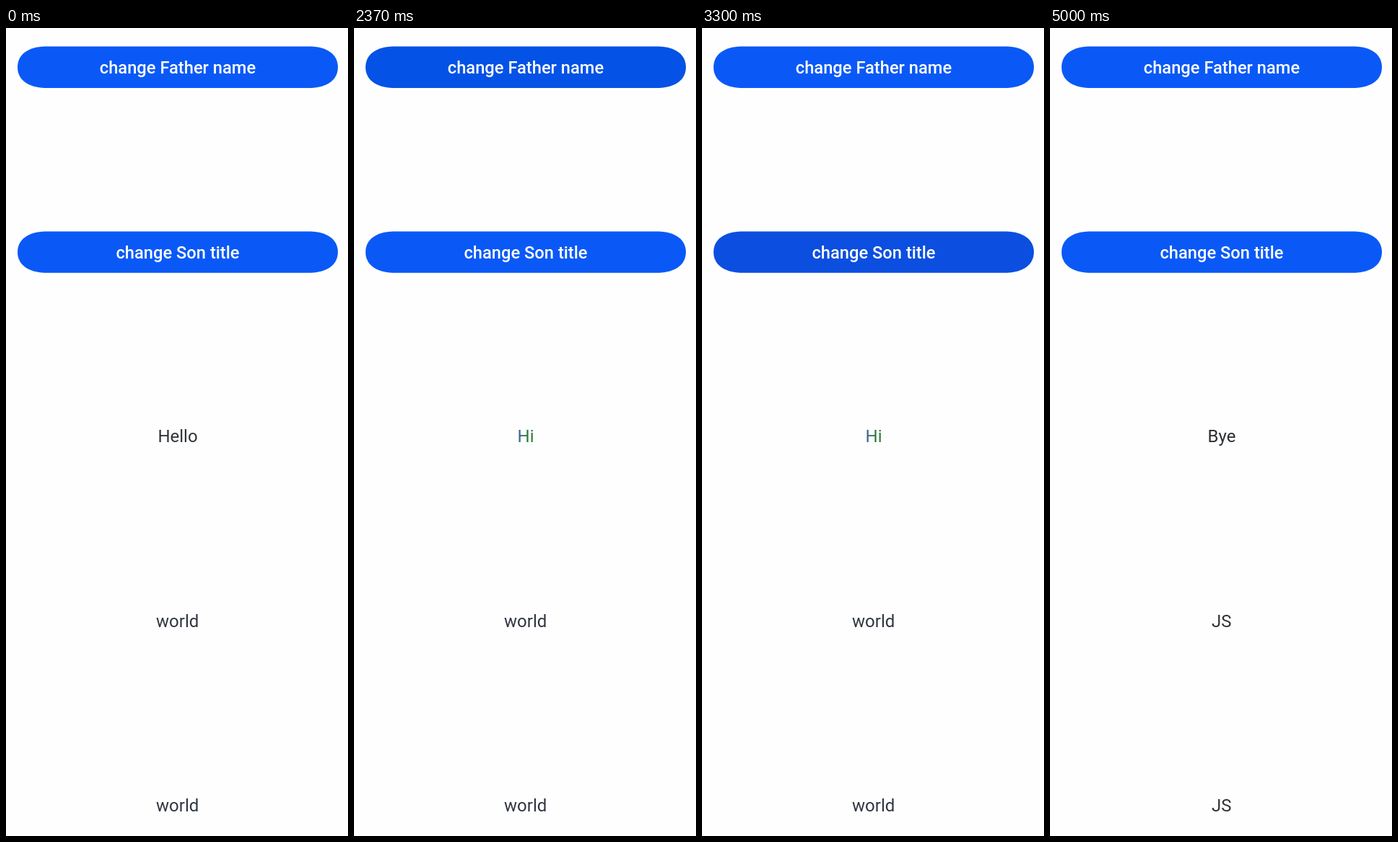
These frames come from a looping animation (474 px wide and 1118 px high, 7.33 s). An HTML page:

```html
<!DOCTYPE html>
<html lang="en">
<head>
<meta charset="utf-8">
<title>Father and Son state</title>
<style>
  html, body { margin: 0; width: 100%; height: 100%; overflow: hidden; background: #fefefe; }
  svg { display: block; width: 100%; height: 100%; }
  text { font: 400 24px Roboto, "Noto Sans", sans-serif; text-anchor: middle; }
  .label { font-weight: 500; font-size: 23.7px; fill: #fff; }
</style>
</head>
<body>
<svg viewBox="0 0 474 1118">
  <defs>
    <linearGradient id="tint" gradientUnits="userSpaceOnUse" x1="228" x2="248" y1="0" y2="0">
      <stop offset="0" stop-color="#3f6688"/>
      <stop offset=".4" stop-color="#3a6c70"/>
      <stop offset=".62" stop-color="#2b7a35"/>
      <stop offset="1" stop-color="#2f7d31"/>
    </linearGradient>
    <path id="pill" d="M54 0H422C445 .6 460 11 460 28.7S445 56.8 422 57.4H54C31 56.8 16 46.4 16 28.7S31 .6 54 0Z"/>
  </defs>
  <use id="father" href="#pill" y="25.6"/>
  <text class="label" x="238" y="63">change Father name</text>
  <use id="son" href="#pill" y="281.4"/>
  <text class="label" x="238" y="318.5">change Son title</text>
  <text id="name" x="238" y="573"></text>
  <text id="title" x="237.7" y="828.5"></text>
  <text id="copy" x="237.7" y="1083.5"></text>
</svg>
<script>
  const LOOP = 7330;
  const BLUE = '#0a59f7';
  const $ = id => document.getElementById(id);

  // Each track lists [start time, value...] steps in ms.
  const tracks = {
    father: [[0, BLUE], [2370, '#0452e6'], [2450, BLUE]],
    son: [[0, BLUE], [3300, '#0c4fe0'], [3380, '#0658f5'], [3760, BLUE]],
    name: [[0, 'Hello', '#303438'], [2370, 'Hi', 'url(#tint)'], [4220, 'Bye', '#2b2e33']],
    title: [[0, 'world', '#2f3641'], [3380, 'ArkUI', '#2f3342'], [5000, 'JS', '#333335']]
  };

  const stepAt = (track, t) => track.filter(step => step[0] <= t).pop();

  function setText(id, [, text, fill]) {
    const el = $(id);
    if (el.textContent !== text) el.textContent = text;
    el.setAttribute('fill', fill);
  }

  function draw(t) {
    for (const id of ['father', 'son']) $(id).setAttribute('fill', stepAt(tracks[id], t)[1]);
    setText('name', stepAt(tracks.name, t));
    const title = stepAt(tracks.title, t);
    setText('title', title);
    setText('copy', title);
  }

  const start = performance.now();
  function tick() {
    draw((performance.now() - start) % LOOP);
    requestAnimationFrame(tick);
  }
  tick();
</script>
</body>
</html>
```
